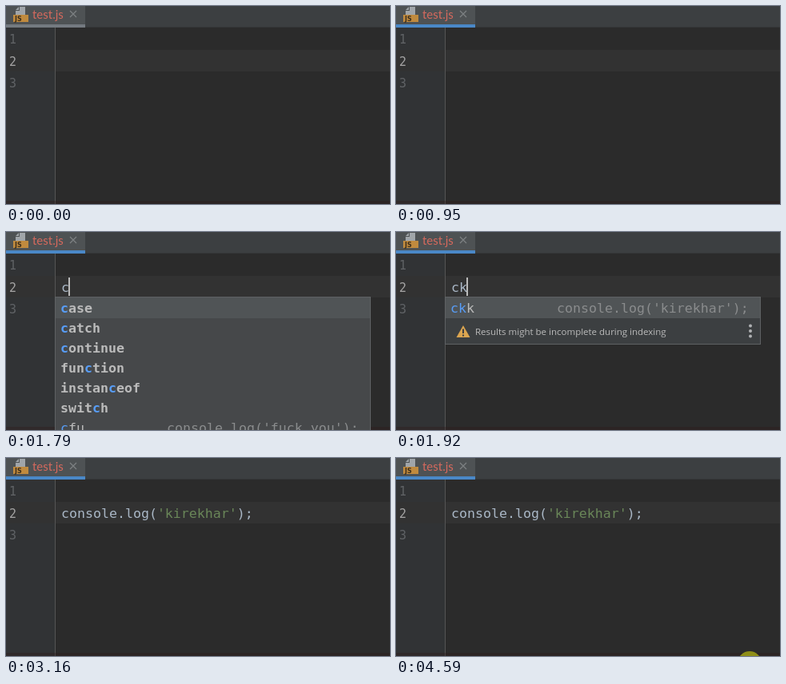
Write an HTML page with a canvas that moves like this. It is 480 px wide and 248 px high and loops after 4660 ms.

```html
<!DOCTYPE html>
<html lang="en">
<head>
<meta charset="utf-8">
<title>Live template in an editor</title>
<style>
html, body { margin: 0; width: 100%; height: 100%; overflow: hidden; background: #2b2b2b; }
canvas { display: block; }
</style>
</head>
<body>
<canvas id="stage" width="480" height="248"></canvas>
<script>
const ctx = document.getElementById('stage').getContext('2d');
const LOOP = 4660;
const STEP = 68.5;
const MONO = '16.6px "DejaVu Sans Mono", monospace';
const BOLD = 'bold ' + MONO;
const GUTTER = '15px "DejaVu Sans Mono", monospace';
const TITLE = '15px Lato, sans-serif';
const LABEL = '11.5px "Open Sans", sans-serif';
const CODE = '#a9b7c6', STRING = '#6a8759', BLUE = '#589df6', PLAIN = '#bbbbbb', DIM = '#8a8c8d';
const KEYWORDS = ['case', 'catch', 'continue', 'function', 'instanceof', 'switch'];

function rect(x, y, w, h, color) {
  ctx.fillStyle = color;
  ctx.fillRect(x, y, w, h);
}

function disc(x, y, r, color) {
  ctx.fillStyle = color;
  ctx.beginPath();
  ctx.arc(x, y, r, 0, Math.PI * 2);
  ctx.fill();
}

function polygon(points, color) {
  ctx.fillStyle = color;
  ctx.beginPath();
  points.forEach(([x, y]) => ctx.lineTo(x, y));
  ctx.closePath();
  ctx.fill();
}

function strokeLines(lines, color, width) {
  ctx.strokeStyle = color;
  ctx.lineWidth = width;
  ctx.beginPath();
  for (const [x1, y1, x2, y2] of lines) {
    ctx.moveTo(x1, y1);
    ctx.lineTo(x2, y2);
  }
  ctx.stroke();
}

// Draws coloured runs one after another on a shared baseline.
function runs(x, y, font, ...parts) {
  ctx.font = font;
  for (const [text, color] of parts) {
    ctx.fillStyle = color;
    ctx.fillText(text, x, y);
    x += ctx.measureText(text).width;
  }
}

function drawFileIcon() {
  polygon([[17, 1], [24, 1], [24, 11], [12, 11], [12, 6], [17, 6]], '#a0a5a9');
  polygon([[16, 1], [16, 5], [12, 5]], '#a0a5a9');
  rect(9, 11, 19, 9, '#c08a3e');
  runs(11, 18.5, 'bold 8px "DejaVu Sans", sans-serif', ['JS', '#3b2e1c']);
}

function drawEditor(focused) {
  rect(0, 0, 480, 248, '#2b2b2b');
  rect(0, 27, 61, 221, '#313335');
  rect(0, 55, 480, 27, '#323232');
  rect(61, 27, 1, 221, '#555555');
  rect(0, 244, 480, 4, 'rgba(48, 20, 20, 0.28)');

  rect(0, 0, 480, 26, '#3c3f41');
  rect(0, 26, 480, 1, '#353738');
  rect(0, 0, 99, 23, '#4e5254');
  rect(0, 23, 99, 4, focused ? '#4a88c7' : '#747a80');
  drawFileIcon();
  runs(33, 16, TITLE, ['test.js', '#d5695d']);
  strokeLines([[80, 6, 88, 14], [88, 6, 80, 14]], '#7d8183', 1.2);

  [1, 2, 3].forEach(n =>
    runs(4, 47 + Math.round((n - 1) * 27.5), GUTTER, [n, n === 2 ? '#a4a3a3' : '#606366']));
}

function drawCode(t) {
  if (t >= 2530) {
    runs(69, 75, MONO, ['console.log(', CODE], ["'kirekhar'", STRING], [');', CODE]);
  } else if (t >= 1660) {
    runs(69, 75, MONO, [t < 1920 ? 'c' : t < 2050 ? 'ck' : 'ckk', CODE]);
  }
}

function caretX(t) {
  if (t < 1580) return null;
  if (t < 1660) return 68;
  if (t < 1920) return 78;
  if (t < 2050) return 88;
  if (t < 2530) return 98;
  return t < 3160 || (t >= 3690 && t < 4220) ? 308 : null;
}

function drawPopupFrame(height) {
  rect(61, 81, 395, height, '#5e6163');
  rect(62, 82, 393, height - 2, '#46484a');
  rect(62, 82, 393, 26, '#505456');
}

function drawKeywordPopup() {
  drawPopupFrame(180);
  KEYWORDS.forEach((word, i) => {
    const at = word.indexOf('c');
    runs(68, 101 + i * 25, BOLD,
      [word.slice(0, at), PLAIN], ['c', BLUE], [word.slice(at + 1), PLAIN]);
  });
  runs(68, 251, MONO, ['c', BLUE], ['fu', PLAIN]);
  runs(201, 251, MONO, ["console.log('fuck you');", DIM]);
}

function drawTemplatePopup(matched) {
  drawPopupFrame(60);
  runs(68, 101, MONO, ['ckk'.slice(0, matched), BLUE], ['ckk'.slice(matched), PLAIN]);
  runs(201, 101, MONO, ["console.log('kirekhar');", DIM]);

  rect(62, 108, 393, 32, '#3c3f41');
  polygon([[84, 117], [92.5, 132], [75.5, 132]], '#dba550');
  rect(83, 121.5, 2, 5.5, '#3c3f41');
  rect(83, 128.5, 2, 2, '#3c3f41');
  runs(99, 129, LABEL, ['Results might be incomplete during indexing', PLAIN]);
  [117.5, 124, 130.5].forEach(y => disc(443, y, 2, '#afb1b3'));
}

function drawPopup(t) {
  if (t >= 1790 && t < 1920) drawKeywordPopup();
  else if (t >= 1920 && t < 2460) drawTemplatePopup(t < 2130 ? 2 : 3);
}

// The pointer glides in with an ease-out, then later sweeps down to the right.
function pointerAt(t) {
  if (t >= 70 && t < 950) {
    const k = Math.min(6, Math.floor((t - 69) / STEP)) / 6;
    const ease = 1 - (1 - k) ** 2;
    return [Math.round(341 - 213 * ease), Math.round(192 - 117 * ease)];
  }
  if (t >= 3840 && t < 4390) {
    const sweep = [[117, 62], [126, 44], [172, 40], [262, 62], [350, 108], [425, 166], [453, 214], [445, 240]];
    return sweep[Math.min(7, Math.floor((t - 3839) / STEP))];
  }
  return null;
}

function drawPointer(t) {
  if (t >= 610 && t < 750) disc(126, 74, 15, '#92911b');
  if (t >= 4590) disc(442, 257, 15, '#8f8e18');
  const pos = pointerAt(t);
  if (!pos) return;
  const [x, y] = pos;
  strokeLines([
    [x + 0.5, y - 6, x + 0.5, y + 6],
    [x - 3, y - 6.5, x, y - 6.5], [x + 1, y - 6.5, x + 4, y - 6.5],
    [x - 3, y + 6.5, x, y + 6.5], [x + 1, y + 6.5, x + 4, y + 6.5]
  ], '#d6d6d0', 1);
}

function render(now) {
  const t = now % LOOP;
  drawEditor(t >= 680);
  drawCode(t);
  const x = caretX(t);
  if (x !== null) rect(x, 57, 2, 23, '#bbbbbb');
  drawPopup(t);
  drawPointer(t);
}

const start = performance.now();
function tick() {
  render(performance.now() - start);
  requestAnimationFrame(tick);
}
tick();
</script>
</body>
</html>
```
